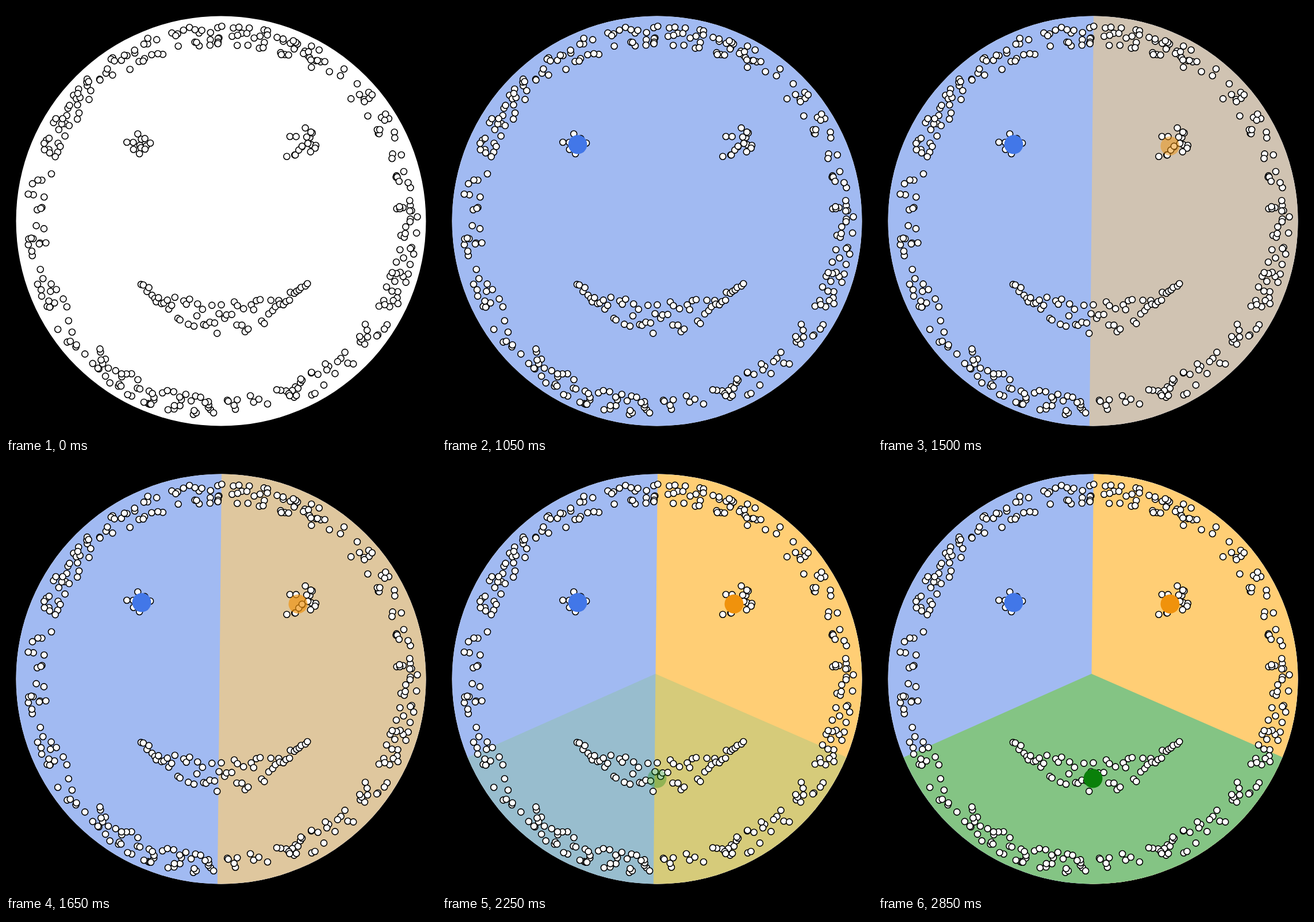
Write an HTML page with a canvas that moves like this. It is 748x748 px and loops after 3.55 s.

```html
<!DOCTYPE html>
<html>
<head>
<meta charset="utf-8">
<style>
html, body { margin: 0; height: 100%; overflow: hidden; background: #000; }
canvas { display: block; }
</style>
</head>
<body>
<canvas id="stage" width="748" height="748"></canvas>
<script>
const ctx = document.getElementById('stage').getContext('2d');
const SIZE = 748, MID = SIZE / 2, DISC = 356.5;
const LOOP = 3550, STEP = 150, FADE_STEPS = 6;
const TAU = 2 * Math.PI;

// Each cluster: centre, its colour, the area nearest to it and that area's tint.
const clusters = [
  { x: 236, y: 241, color: '#4277e8', tint: '#a1baf2',
    area: [[0, 0], [SIZE, 0], [SIZE, SIZE], [0, SIZE]] },
  { x: 508, y: 243.5, color: '#f0920c', tint: '#ffce75',
    area: [[375.2, 0], [SIZE, 0], [SIZE, SIZE], [367.7, SIZE]] },
  { x: 374, y: 547, color: '#0a800a', tint: '#84c484',
    area: [[371.4, 365], [SIZE, 529.5], [SIZE, SIZE], [0, SIZE], [0, 530]] }
];

let seed = 123456;
function random(min = 0, max = 1) {
  seed = (seed * 16807) % 2147483647;
  return min + (max - min) * seed / 2147483647;
}

const repeat = (count, make) => Array.from({ length: count }, (_, i) => make(i));

const polar = (x, y, radius, angle) =>
  [x + radius * Math.cos(angle), y + radius * Math.sin(angle)];

// The rim is a ring of small clumps of varying size.
function rim(clumps) {
  return repeat(clumps, i => repeat(Math.round(random(4, 14)), () => {
    const angle = (i + random(-0.6, 0.6)) / clumps * TAU;
    return polar(MID, MID, random(306, 343), angle);
  })).flat();
}

function eye(count, x, y, radius) {
  return repeat(count, () => polar(x, y, radius * Math.sqrt(random()), random(0, TAU)));
}

// The smile follows a parabola, thick in the middle and thin at the ends.
function smile(count) {
  return repeat(count, i => {
    const u = 2 * (i + random()) / count - 1;
    const bulge = 1 - u * u;
    return [379 + 147 * u, 481 + bulge * (64 + random(-30, 30))];
  });
}

const dots = [...rim(40), ...eye(12, 236, 236, 26), ...eye(18, 510, 241, 31), ...smile(64)];

function circle(x, y, radius, fill) {
  ctx.beginPath();
  ctx.arc(x, y, radius, 0, TAU);
  ctx.fillStyle = fill;
  ctx.fill();
}

function polygon(points, fill) {
  ctx.beginPath();
  points.forEach(p => ctx.lineTo(...p));
  ctx.fillStyle = fill;
  ctx.fill();
}

function draw(time) {
  const step = Math.floor(time % LOOP / STEP) - 1;
  const opacity = i => Math.min(1, Math.max(0, step / FADE_STEPS - i));

  ctx.globalAlpha = 1;
  ctx.fillStyle = '#000';
  ctx.fillRect(0, 0, SIZE, SIZE);
  circle(MID, MID, DISC, '#fff');

  ctx.save();
  ctx.clip();
  clusters.forEach((c, i) => {
    ctx.globalAlpha = opacity(i);
    polygon(c.area, c.tint);
  });
  ctx.restore();

  ctx.strokeStyle = '#000';
  ctx.lineWidth = 1.6;
  for (const [x, y] of dots) {
    circle(x, y, 5.5, '#fff');
    ctx.stroke();
  }

  clusters.forEach((c, i) => {
    ctx.globalAlpha = opacity(i);
    circle(c.x, c.y, 16.5, c.color);
  });
}

const start = performance.now();
function tick() {
  draw(performance.now() - start);
  requestAnimationFrame(tick);
}
tick();
</script>
</body>
</html>
```
